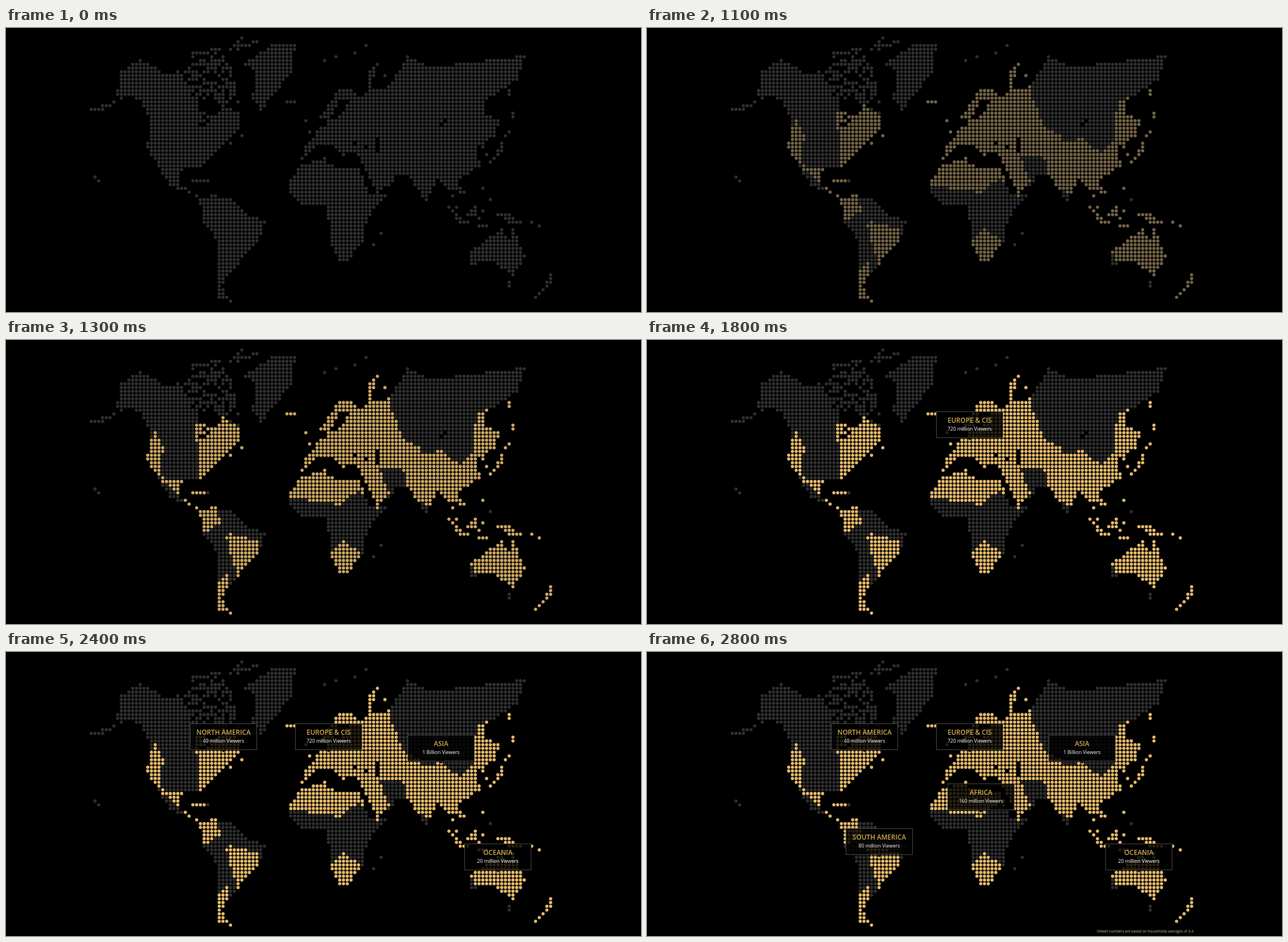
These frames come from a looping animation (1118x501 px, 7.8 s). An HTML page with a canvas:

```html
<!DOCTYPE html>
<html lang="en">
<head>
<meta charset="utf-8">
<title>Viewers by region</title>
<style>
html, body { margin: 0; width: 100%; height: 100%; overflow: hidden; background: #000; }
canvas { display: block; }
</style>
</head>
<body>
<canvas id="stage" width="1118" height="501"></canvas>
<script>
const ctx = document.getElementById('stage').getContext('2d');
const LOOP = 7800;
const PITCH = 6.63, LEFT = 150, TOP = 17.6, COLS = 126, ROWS = 71, RADIUS = 2.8;
const GRAY = '#2f2f2f', GOLD = '#e3b768';

// Rough coastlines in grid units; every dot on or inside one is land.
const americas = `
  M13 6L20 10 23 9 25 15 28 16 28 23 32 25 35 18 39 20 39 24 36 27 29 34 23 35 23 39 28 42 21 39 15 29 16 22 13 16 7 15 8 9Z
  M29 43L32 42 37 43 41 47 46 49 44 54 37 62 34 66 37 70 34 69 34 54 30 49Z
  M48 2L54 2 53 9 45 19 43 16 44 9 41 7Z`;
const oldWorld = `
  M56 32L57 29 61 24 67 20 70 15 72 16 74 14 79 14 84 5 90 8 115 5 113 11 104 17 104 20 108 22 107 26 102 29 103 34 97 38 99 41 95 40 92 37 89 43 84 36 80 36 80 38 76 41 72 33 70 30 67 31 64 28 60 28Z
  M69 14L66 14 61 21 63 22 66 16 70 17Z
  M56 34L62 32 62 34 71 35 74 42 78 42 73 48 72 54 68 59 66 59 64 55 64 51 62 44 56 44 53 41 53 38Z
  M101 57L109 51 111 54 112 51 115 58 112 63 106 59 101 60Z`;
const islands = `
  M0 19L3 19 8 16M1 37L2 38M37 28L40 26M27 38L31 38M52 17L54 17
  M62 6L65 5M70 4L73 2M76 7Q73 9 74 13M78 10L79 13M57 22L58 25M77 52L75 55
  M111 14L112 21M111 25Q109 26 109 30L106 33M104 29L105 31
  M96 42L97 45M95 45L98 49 100 49M103 50L105 50M104 40L106 43
  M102 45L102 47 100 47ZM104 46L103 48M108 47L111 47 114 49 111 49ZM117 49L119 50
  M111 65L111 66M122 63L122 65 118 69`;
const water = 'M70 28L73 29M76 27L76 30M94 22L93 23';
const archipelago = 'M27 4L36 2 39 18 25 15 24 10ZM40 0L45 1 36 4ZM29 20L33 21 33 26 29 25Z';
const covered = `
  M17 22L19 26 18 33 19 35 24 35 31 37 28 41 33 41 34 46 29 49 29 44 14 29Z
  M28 20L35 18 42 23 42 27 29 36Z
  M37 49L44 51 44 54 39 60 36 50Z
  M36 60L38 71 33 71 34 62Z
  M67 51L71 54 71 60 64 60 64 54Z
  M122 62L123 66 117 70Z
  M50 15L73 6 79 8 79 15 83 24 87 26 87 28 93 27 98 31 102 27 102 21 103 17 110 14 116 14 110 36 105 36 104 43 120 49 116 64 104 62 94 46 84 37 83 31 76 31 79 38 76 42 71 37 66 41 53 39 50 36Z`;

const labels = [
  [509, 126, 'EUROPE & CIS', '720 million Viewers'],
  [707, 146, 'ASIA', '1 Billion Viewers'],
  [807, 338, 'OCEANIA', '20 million Viewers'],
  [324, 126, 'NORTH AMERICA', '40 million Viewers'],
  [529, 232, 'AFRICA', '160 million Viewers'],
  [350, 311, 'SOUTH AMERICA', '80 million Viewers']
];
const labelStart = i => 1800 + 200 * i;
const glowSteps = [[1800, 1], [1300, .87], [1200, .63], [1100, .38], [1000, .12]];

const toStage = new DOMMatrix([PITCH, 0, 0, PITCH, LEFT, TOP]);

function outline(d) {
  const path = new Path2D();
  path.addPath(new Path2D(d), toStage);
  return path;
}

function touches(path, x, y) {
  return ctx.isPointInPath(path, x, y, 'nonzero') || ctx.isPointInStroke(path, x, y);
}

function noise(col, row) {
  const v = Math.sin(col * 12.9898 + row * 78.233) * 43758.5453;
  return v - Math.floor(v);
}

function buildDots() {
  const all = new Path2D(), gold = new Path2D();
  const coasts = [americas, oldWorld].map(outline);
  const chains = outline(islands), lakes = outline(water);
  const scatter = outline(archipelago), region = outline(covered);
  ctx.lineWidth = PITCH / 2;
  ctx.lineCap = ctx.lineJoin = 'round';
  const addDot = (path, x, y) => {
    path.moveTo(x + RADIUS, y);
    path.arc(x, y, RADIUS, 0, Math.PI * 2);
  };
  for (let row = 0; row < ROWS; row++) {
    for (let col = 0; col < COLS; col++) {
      const x = LEFT + col * PITCH, y = TOP + row * PITCH;
      const solid = coasts.some(p => touches(p, x, y)) && !touches(lakes, x, y);
      const loose = noise(col, row) < .62 && touches(scatter, x, y);
      if (!solid && !loose && !touches(chains, x, y)) continue;
      addDot(all, x, y);
      if (touches(region, x, y)) addDot(gold, x, y);
    }
  }
  return { all, gold };
}

function text(str, x, y, font, color, align) {
  ctx.font = font + ' "Open Sans", "Noto Sans", sans-serif';
  ctx.fillStyle = color;
  ctx.textAlign = align;
  ctx.fillText(str, x, y);
}

function drawLabel(x, y, title, count) {
  const mid = x + 59, bottom = y + 46;
  ctx.fillStyle = 'rgba(0,0,0,.83)';
  ctx.fillRect(x, y, 118, 47);
  ctx.strokeStyle = '#484848';
  ctx.lineWidth = 1;
  ctx.lineCap = 'butt';
  ctx.lineJoin = 'miter';
  ctx.strokeRect(x + .5, y + .5, 117, 46);
  ctx.beginPath();
  ctx.moveTo(mid - 5, bottom + .5);
  ctx.lineTo(mid, bottom + 5);
  ctx.lineTo(mid + 5, bottom + .5);
  ctx.fill();
  ctx.stroke();
  text(title, mid, y + 20, '600 11.7px', '#d3aa4c', 'center');
  text(count, mid, y + 34, '500 8.65px', '#fff', 'center');
}

const dots = buildDots();

function draw(t) {
  ctx.fillStyle = '#000';
  ctx.fillRect(0, 0, 1118, 501);
  ctx.fillStyle = GRAY;
  ctx.fill(dots.all);

  const step = glowSteps.find(([start]) => t >= start);
  if (step) {
    ctx.globalAlpha = step[1];
    ctx.fillStyle = GOLD;
    ctx.fill(dots.gold);
    ctx.globalAlpha = 1;
  }
  labels.forEach((label, i) => {
    if (t >= labelStart(i)) drawLabel(...label);
  });
  if (t >= 2800) {
    text('Viewer numbers are based on households averages of 3-4', 962, 494.5, '400 6.3px', '#b4b4b4', 'right');
  }
}

function frame() {
  draw(performance.now() % LOOP);
  requestAnimationFrame(frame);
}
frame();
</script>
</body>
</html>
```
